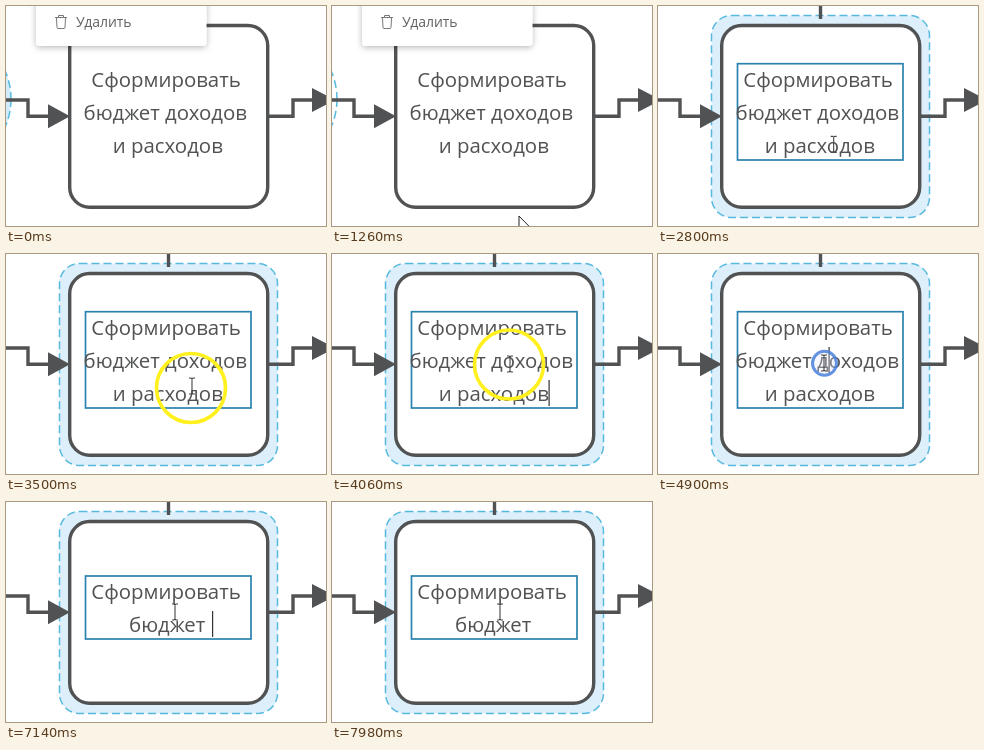
Recreate the animation shown at these times as an HTML page. Size 320 by 220 pixels, loop 8000 ms.

```html
<!DOCTYPE html>
<html lang="ru">
<head>
<meta charset="utf-8">
<style>
html, body { margin: 0; width: 100%; height: 100%; overflow: hidden; background: #fff; }
svg { display: block; width: 320px; height: 220px; }
text { font-family: "Open Sans", "Noto Sans", sans-serif; white-space: pre; }
.label { font-size: 20.4px; fill: #515253; }
.line { fill: none; stroke: #515253; stroke-width: 3.4; }
.head { fill: #515253; }
.halo { stroke: #56b9de; stroke-width: 1.5; stroke-dasharray: 8 4; }
</style>
</head>
<body>
<svg viewBox="0 0 320 220">
  <defs>
    <filter id="shadow" x="-10%" y="-30%" width="120%" height="170%">
      <feDropShadow dx="0" dy="1.5" stdDeviation="3" flood-color="#000" flood-opacity=".28"/>
    </filter>
  </defs>
  <rect width="320" height="220" fill="#fff"/>
  <circle id="event" class="halo" cx="-65" cy="93" r="70"/>
  <rect id="halo" class="halo" x="53.5" y="9.5" width="218" height="202" rx="20"/>
  <path id="stem" class="line" d="M162.5 0V13"/>
  <path class="line" d="M0 94H22V110.3H44M262 110.3H287V94H308"/>
  <path class="head" d="M42 98.3L64 110.3L42 122.3ZM306 82L329 94L306 106Z"/>
  <rect class="line" x="63.7" y="19.5" width="198" height="181.7" rx="20" style="fill:#fff"/>
  <g id="menu">
    <rect x="30" y="-30" width="170.5" height="70" rx="4" fill="#fff" filter="url(#shadow)"/>
    <path d="M49 11.5H61M52.5 11V9.5H57.5V11M50.5 12L51 21.5Q51.1 22.5 52 22.5H58Q58.9 22.5 59 21.5L59.5 12" fill="none" stroke="#77797b"/>
    <text x="70" y="21" font-size="14" fill="#606264">Удалить</text>
  </g>
  <g id="marks" fill="#80c080">
    <rect id="mark1" x="160" y="93" width="86" height="27"/>
    <rect id="mark2" x="107" y="126" width="110" height="27"/>
  </g>
  <rect id="field" x="79.5" width="165.5" fill="none" stroke-width="1.7"/>
  <g id="full" class="label">
    <text x="85.3" y="81.2">Сформировать</text>
    <text x="77.5" y="114.3">бюджет доходов</text>
    <text x="106.8" y="146.8">и расходов</text>
  </g>
  <g id="short" class="label">
    <text x="85.3" y="97.2">Сформировать</text>
    <text x="123" y="130.3">бюджет</text>
  </g>
  <rect id="caret" width="1.2" height="26" fill="#333"/>
  <circle id="spot" r="34.5" fill="none" stroke="#fff01e" stroke-width="3.6"/>
  <circle id="click" fill="#dfe8f8" fill-opacity=".35"/>
  <path id="arrow" d="M0 0V16L3.8 12.6L6.6 19L9.2 17.9L6.5 11.6H11.4Z" fill="#fff" stroke="#222"/>
  <path id="beam" d="M-3 -8H-1L0 -7L1 -8H3M0 -7V7M-3 8H-1L0 7L1 8H3" fill="none" stroke="#444" stroke-width="1.1"/>
</svg>
<script>
const LOOP = 8000, STEP = 140;
const $ = id => document.getElementById(id);
const show = (id, on) => $(id).style.display = on ? "" : "none";
const set = (id, attrs) => {
  for (const key in attrs) $(id).setAttribute(key, attrs[key]);
};

// Pointer path: time, x, y
const path = [
  [1260, 187, 210], [1540, 170.5, 141.5], [2660, 170.5, 141.5], [3080, 186, 132],
  [3500, 186, 132], [4060, 178, 110], [4480, 166, 109], [5460, 166, 109], [5740, 169, 110],
  [7140, 169, 110], [7420, 168, 110]
];

function pointer(t) {
  const i = path.findIndex(p => p[0] > t);
  if (i === 0) return path[0].slice(1);
  if (i < 0) return path[path.length - 1].slice(1);
  const [a, x, y] = path[i - 1], [b, u, v] = path[i];
  const k = (t - a) / (b - a);
  return [x + (u - x) * k, y + (v - y) * k];
}

// Caret position, or null while blinked off
function caretAt(t) {
  if (t >= 7140) return t < 7420 || (t >= 7700 && t < 7980) ? [206, 109] : null;
  if (t >= 5740 || t < 2800) return null;
  if (t >= 5180) return [159.5, 93];
  if (t >= 4760) return [170.5, 93];
  return (t >= 2940 && t < 3500) || t >= 4060 ? [216.5, 126] : null;
}

// Click ring: radius and opacity
function ringAt(t) {
  if (t >= 2240 && t < 2520) return [8.8, 1];
  if (t >= 2520 && t < 2800) return [9 + (t - 2380) / 35, .7];
  if (t >= 4760 && t < 5180) return [8 + (t - 4760) / 35, 1 - (t - 4760) / 900];
  return null;
}

function draw(time) {
  const t = Math.floor((time % LOOP) / STEP) * STEP;
  const editing = t >= 2660, cut = t >= 7140, hover = t >= 1400;
  const [x, y] = pointer(t);
  const move = `translate(${x} ${y})`;

  show("event", !editing);
  set("event", { fill: t < 1260 ? "#d3ecfb" : "#fff" });
  show("menu", !editing);
  show("stem", editing);
  show("halo", hover);
  set("halo", { fill: editing ? "#dceffb" : "#fff" });

  show("field", hover);
  set("field", {
    y: cut ? 74 : 57.7, height: cut ? 63 : 96.3,
    stroke: editing ? "#2a82ae" : "#1c6ca6",
    "stroke-dasharray": editing ? "none" : "6 4"
  });
  show("full", !cut);
  show("short", cut);
  show("mark1", t >= 5740 && !cut);
  show("mark2", t >= 5880 && !cut);

  const caret = caretAt(t);
  show("caret", caret);
  if (caret) set("caret", { x: caret[0], y: caret[1] });

  show("spot", t >= 3500 && t < 4620);
  set("spot", { cx: x - 1, cy: y + (t < 4060 ? 2 : 0.5) });

  const ring = ringAt(t);
  show("click", ring);
  if (ring) set("click", {
    cx: x + 0.5, cy: y + 0.3, r: ring[0], opacity: ring[1],
    stroke: editing ? "#4a7fdc" : "#3f66d8",
    "stroke-width": editing ? 3 : 3.6
  });

  show("arrow", t >= 1260 && !editing);
  show("beam", editing);
  set("arrow", { transform: move });
  set("beam", { transform: move });
}

const start = performance.now();
function tick() {
  draw(performance.now() - start);
  requestAnimationFrame(tick);
}
tick();
</script>
</body>
</html>
```
